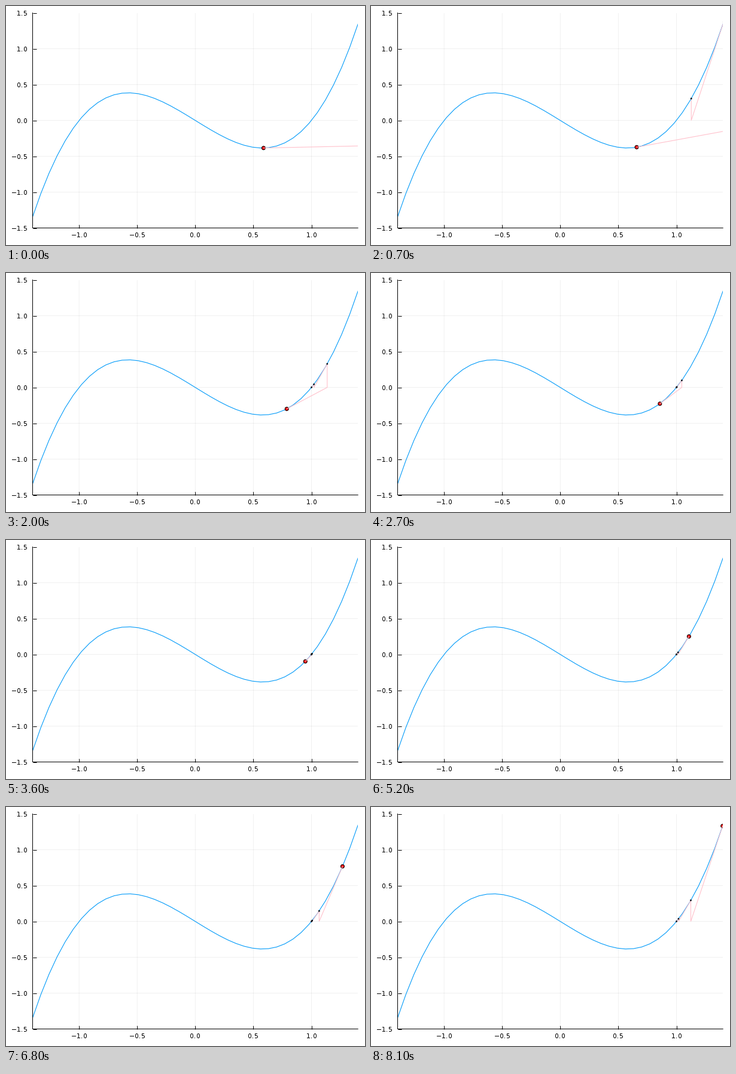
A matplotlib script that plays this animation: 600x400 px, repeating every 8.2 s.

```python
import numpy as np
import matplotlib.pyplot as plt
from matplotlib.animation import FuncAnimation
from matplotlib.patches import Ellipse

WIDTH, HEIGHT, DPI = 600, 400, 100
LEFT, RIGHT, TOP, BOTTOM = 44.5, 588.2, 11.5, 371.5
X_MAX, Y_MAX = 1.4, 1.5
PX = 72 / DPI  # one pixel in points
FRAMES, INTERVAL = 82, 100
STEPS = 3
START = 1 / np.sqrt(3) + 0.01

plt.rcParams.update({
    "font.family": "DejaVu Sans",
    "font.size": 11 * PX,
    "text.hinting": "default",
    "text.hinting_factor": 1,
    "path.snap": False,
})


def f(x):
    return x**3 - x


def newton_step(x):
    return x - f(x) / (3 * x**2 - 1)


def newton_points(x):
    points = [x]
    for _ in range(STEPS):
        points.append(newton_step(points[-1]))
    return np.array(points)


def newton_path(points):
    """Follow each tangent to the axis, then go straight back to the curve."""
    path = [(points[0], f(points[0]))]
    for x in points[1:]:
        path += [(x, 0), (x, f(x))]
    return np.array(path).T


def add_dot(diameter, color, zorder):
    """Dot of a fixed pixel size that can sit between pixels."""
    width = diameter * 2 * X_MAX / (RIGHT - LEFT)
    height = diameter * 2 * Y_MAX / (BOTTOM - TOP)
    return ax.add_patch(Ellipse((0, 0), width, height, fc=color, ec="black",
                                lw=PX, zorder=zorder))


fig = plt.figure(figsize=(WIDTH / DPI, HEIGHT / DPI), dpi=DPI, facecolor="white")
ax = fig.add_axes([LEFT / WIDTH, 1 - BOTTOM / HEIGHT,
                   (RIGHT - LEFT) / WIDTH, (BOTTOM - TOP) / HEIGHT])
ax.set_xlim(-X_MAX, X_MAX)
ax.set_ylim(-Y_MAX, Y_MAX)
ax.set_xticks(np.arange(-1, 1.1, 0.5))
ax.set_yticks(np.arange(-1.5, 1.6, 0.5))
ax.xaxis.set_major_formatter("{x:.1f}")
ax.yaxis.set_major_formatter("{x:.1f}")
ax.tick_params(direction="in", length=6 * PX, width=PX)
ax.tick_params(axis="x", pad=6.6 * PX)
ax.tick_params(axis="y", pad=8.3 * PX)
ax.grid(color="black", alpha=0.06, linewidth=PX)
ax.set_axisbelow(True)
ax.spines[["top", "right"]].set_visible(False)
ax.spines[["left", "bottom"]].set_linewidth(PX)

xs = np.linspace(-X_MAX, X_MAX, 41)
ax.plot(xs, f(xs), color="#009af9", lw=1.1 * PX, zorder=2)

start_dot = add_dot(6, "red", 3)
tangents, = ax.plot([], [], color="pink", lw=1.1 * PX, zorder=4,
                    solid_joinstyle="bevel")
step_dots = [add_dot(1.8, "#3f8fdc", 5) for _ in range(STEPS)]


def update(frame):
    points = newton_points(START + 0.01 * frame)
    tangents.set_data(*newton_path(points))
    for dot, x in zip([start_dot, *step_dots], points):
        dot.set_center((x, f(x)))
    return start_dot, tangents, *step_dots


anim = FuncAnimation(fig, update, frames=FRAMES, interval=INTERVAL,
                     repeat=True, repeat_delay=0)
plt.show()
```
